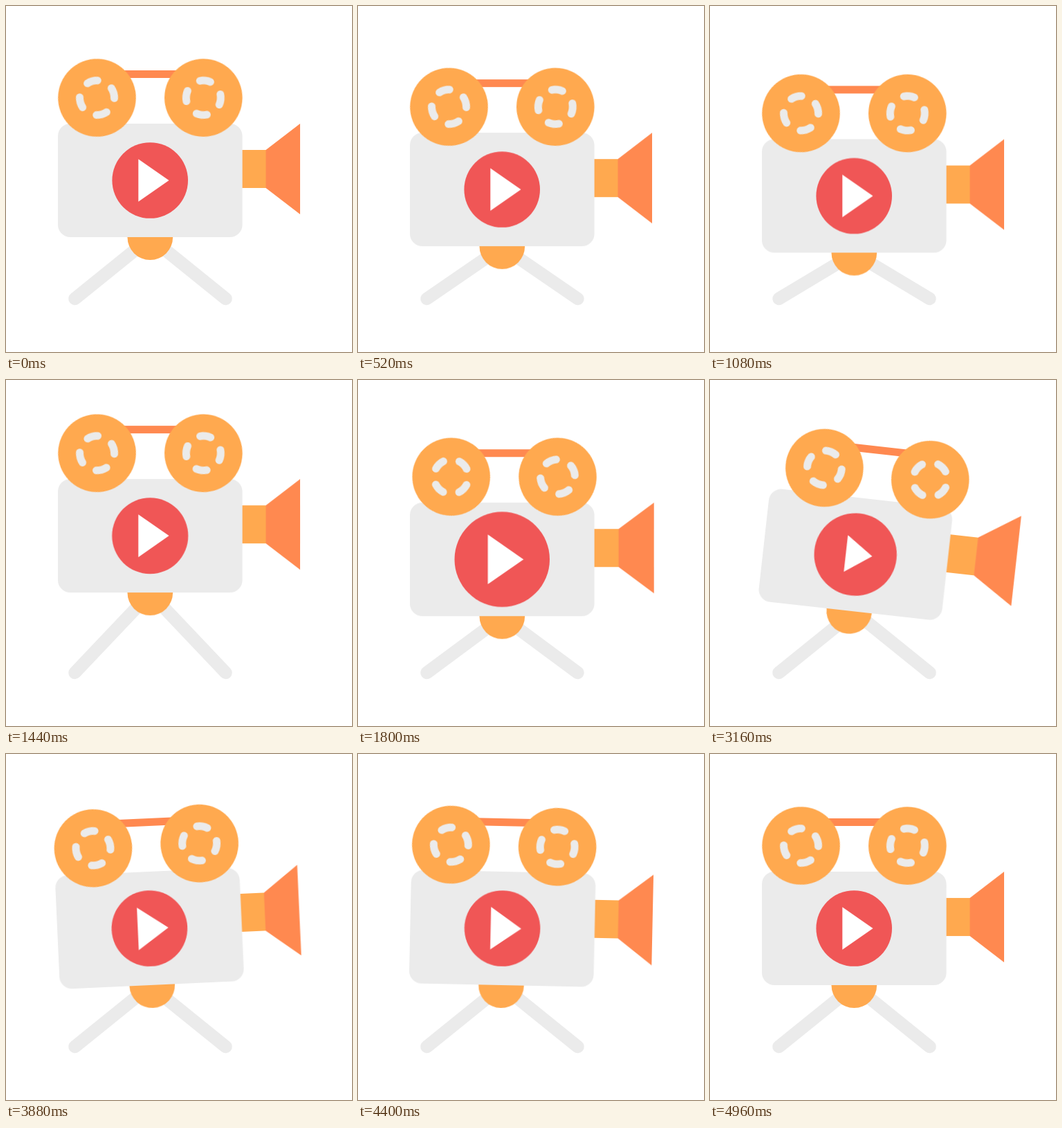
An HTML page for the animation above (5 s loop, 500 by 500 pixels).

```html
<!DOCTYPE html>
<html lang="en">
<head>
<meta charset="utf-8">
<title>Film camera</title>
<style>
  html, body { margin: 0; width: 100%; height: 100%; overflow: hidden; background: #fff; }
  svg { display: block; width: 100vw; height: 100vh; }

  .grey { fill: #ebebeb; }
  .orange { fill: #ffa94f; }
  .coral { fill: #ff8950; }
  .red { fill: #f05656; }
  .line { fill: none; stroke: #ebebeb; stroke-linecap: round; }

  .legs, .lift, .tilt, .lens, .reels, .spin, .disc, .play {
    animation: 5s cubic-bezier(.37, 0, .63, 1) infinite;
  }
  .legs { animation-name: legs; }
  .lift { animation-name: lift; }
  .tilt { animation-name: tilt; transform-origin: 208px 270px; }
  .lens { animation-name: stretch; transform-origin: 342px 0; }
  .reels { animation-name: slide; }
  .spin { animation-name: spin; transform-origin: 0 0; }
  .disc { animation-name: pulse; transform-origin: 208.2px 252px; }
  .play { animation-name: throb; transform-origin: 213.4px 252px; }

  /* The feet stay put while the hip follows the lift. */
  @keyframes legs {
    0%, 44.8%, 100% { d: path("M99.5 423L208.5 335L317.5 423"); }
    20.2% { d: path("M99.5 423L208.5 360L317.5 423"); }
    30.4% { d: path("M99.5 423L208.5 305L317.5 423"); }
    36.8% { d: path("M99.5 423L208.5 343.6L317.5 423"); }
  }
  @keyframes lift {
    0%, 44.8%, 100% { transform: translateY(0); }
    20.2% { transform: translateY(25px); }
    30.4% { transform: translateY(-30px); }
    36.8% { transform: translateY(8.6px); }
  }
  @keyframes tilt {
    0%, 44.8%, 100% { transform: rotate(0deg); }
    60.4% { transform: rotate(7deg); }
    77.6% { transform: rotate(-2.6deg); }
    89.6% { transform: rotate(1.35deg); }
  }
  @keyframes stretch {
    0%, 28%, 80%, 100% { transform: scaleX(1); }
    58.4%, 59.2% { transform: scaleX(1.2); }
  }
  @keyframes slide {
    0%, 28%, 80%, 100% { transform: translateX(0); }
    58.4%, 59.2% { transform: translateX(20px); }
  }
  @keyframes spin {
    0%, 28%, 79.4%, 100% { transform: rotate(0deg); }
    57.4% { transform: rotate(360deg); }
  }
  @keyframes pulse {
    0%, 28%, 73.6%, 100% { transform: scale(1); }
    38.4% { transform: scale(1.29); }
    50.6% { transform: scale(.71); }
    63.6% { transform: scale(1.09); }
  }
  @keyframes throb {
    0%, 28%, 74%, 100% { transform: scale(1); }
    38.4% { transform: scale(1.19); }
    56.4% { transform: scale(.8); }
  }
</style>
</head>
<body>
<svg viewBox="0 0 500 500">
  <defs>
    <path id="slot" class="line" stroke-width="11" d="M23.8 -7.6A25 25 0 0 1 23.8 7.6"/>
    <g id="reel">
      <circle class="orange" r="56.3"/>
      <use href="#slot"/>
      <use href="#slot" transform="rotate(90)"/>
      <use href="#slot" transform="rotate(180)"/>
      <use href="#slot" transform="rotate(270)"/>
    </g>
  </defs>
  <path class="legs line" stroke-width="18.5" d="M99.5 423L208.5 335L317.5 423"/>
  <g class="lift">
    <g class="tilt">
      <circle class="orange" cx="208.3" cy="334.2" r="32.8"/>
      <g class="lens">
        <path class="orange" d="M338 208H376V263H338Z"/>
        <path class="coral" d="M375.5 208L425 170V301L375.5 263Z"/>
      </g>
      <rect class="grey" x="75" y="170" width="266.6" height="164" rx="18"/>
      <g class="reels">
        <path class="coral" d="M131 93H285V104H131Z"/>
        <g transform="translate(131.5 132.6) rotate(-16)"><use class="spin" href="#reel"/></g>
        <g transform="translate(285.3 132.6) rotate(6)"><use class="spin" href="#reel"/></g>
      </g>
      <circle class="disc red" cx="208.2" cy="252" r="54.8"/>
      <path class="play" fill="#fff" d="M191.3 221.2L235.5 252L191.3 282.8Z"/>
    </g>
  </g>
</svg>
</body>
</html>
```
